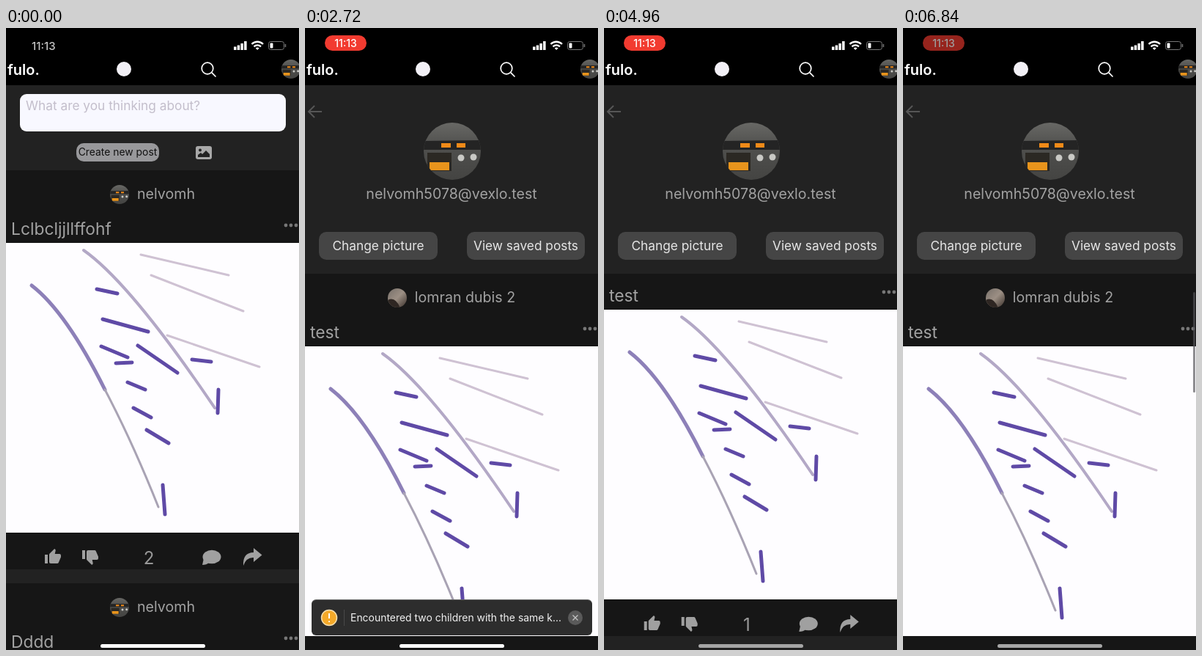
An HTML page that plays this animation: 400x848 px, repeating every 6880 ms.

```html
<!DOCTYPE html>
<html lang="en">
<head>
<meta charset="utf-8">
<title>Feed and profile</title>
<style>
@property --y { syntax: "<number>"; inherits: true; initial-value: 0; }

html, body { margin: 0; width: 100%; height: 100%; overflow: hidden; background: #222; }
body { font-family: Inter, Roboto, sans-serif; color: #a2a2a2; }
#stage { position: relative; width: 400px; height: 848px; overflow: hidden; background: #222; }
#stage * { box-sizing: border-box; }
.abs, .view, .t { position: absolute; }
.view { inset: 0; }
.t { line-height: 1; transform: translateY(-50%); white-space: pre; }
.mid { left: 0; width: 100%; text-align: center; }
svg { position: absolute; left: 0; top: 0; overflow: visible; }

/* Every timeline shares one loop */
.anim { animation: 6.88s linear infinite; }

/* Header */
.head { left: 0; top: 0; width: 400px; height: 78px; background: #000; overflow: hidden; }
.brand { left: 2px; top: 57px; font-size: 20px; font-weight: 600; color: #fff; }
.clock { left: 35px; top: 24px; font-size: 15px; font-weight: 500; color: #c4c4c4; animation-name: clock; }
.pill { left: 27px; top: 10px; width: 57px; height: 21px; border-radius: 11px; background: #d6382d; animation-name: pill; }
.pill .t { top: 10.5px; font-size: 14px; font-weight: 500; color: #fff; }
.rec { animation-name: early; }
.pilltime { animation-name: late; }
.face { left: 376px; top: 43px; width: 26px; height: 26px; animation-name: face; }
.rec, .pilltime, .home, .stale, .fresh { animation-timing-function: step-end; }

/* Home */
.home { animation-name: home; }
.field { left: 19px; top: 90px; width: 363px; height: 51px; border-radius: 9px; background: #f8f8ff; }
.field .t { left: 8px; top: 16px; font-size: 17.3px; color: #c3becb; }
.create { left: 96px; top: 157px; width: 113px; height: 25px; border-radius: 10px; background: #98989b; color: #111; }
.create .t { top: 12.5px; font-size: 13.9px; }

/* Posts */
.post { left: 0; width: 400px; height: 544px; background: #161616; }
.who { left: 0; top: 20px; width: 100%; height: 26px; display: flex; justify-content: center; align-items: center; gap: 11px; font-size: 19.6px; line-height: 1; }
.who svg { position: static; flex: none; }
.title { left: 7px; top: 79.7px; font-size: 22.8px; }
.pic { left: 0; top: 99px; width: 400px; height: 395px; overflow: hidden; background: #fefdff; }
.count { left: 0; width: 390px; top: 529px; text-align: center; font-size: 24px; color: #999; }
.bare .who svg, .bare .dots { visibility: hidden; }

/* Profile */
.profile { animation-name: profile; }
.email { top: 227px; font-size: 19.6px; }
.btn { top: 278px; width: 162px; height: 38px; border-radius: 10px; background: #454545; color: #e6e6e6; }
.btn .t { top: 19px; font-size: 17.3px; }
.list { left: 0; top: 335px; width: 400px; height: 513px; overflow: hidden; animation-name: scroll; }
.track { inset: 0; transform: translateY(calc(var(--y) * -1px)); }
.thumb { left: 396px; top: 25px; width: 3px; height: 137px; border-radius: 2px; background: rgba(84, 84, 88, .66); transform: translateY(calc(var(--y) * .265px)); }
.fade { inset: 0; animation-name: thumb; }
.stale { animation-name: stale; }
.fresh { animation-name: fresh; }

/* Toast */
.toast { left: 9px; top: 780px; width: 383px; height: 48px; border-radius: 6px; background: #2d2d2d; box-shadow: 0 -1px 0 #666; animation-name: toast; }
.toast .t { left: 53px; top: 24px; font-size: 13.95px; color: #f0f0f0; }
.bar { left: 129px; top: 840px; width: 143px; height: 5px; border-radius: 3px; animation-name: bar; }

@keyframes clock { 0%, 1% { opacity: 1 } 4%, 100% { opacity: 0 } }
@keyframes pill {
  0%, 1% { opacity: 0 }
  4%, 28% { opacity: 1; background: #d6382d }
  34%, 97.4% { opacity: 1; background: #f23b30 }
  99.4%, 100% { opacity: .62; background: #f23b30 }
}
@keyframes early { 0% { opacity: 1 } 29%, 100% { opacity: 0 } }
@keyframes late { 0% { opacity: 0 } 29%, 100% { opacity: 1 } }
@keyframes home { 0% { visibility: visible } 11.04%, 100% { visibility: hidden } }
@keyframes profile {
  0% { opacity: 0 }
  11.04% { opacity: 0; animation-timing-function: ease-in-out }
  19.8%, 100% { opacity: 1 }
}
@keyframes face {
  0%, 11.03% { opacity: 1 }
  11.04% { opacity: 0; animation-timing-function: ease-in-out }
  19.8%, 100% { opacity: 1 }
}
@keyframes stale { 0% { visibility: visible } 26.16%, 100% { visibility: hidden } }
@keyframes fresh { 0% { visibility: hidden } 26.16%, 100% { visibility: visible } }
@keyframes scroll {
  0% { --y: 0 }
  43.02% { --y: 0; animation-timing-function: cubic-bezier(.5, 0, .8, .5) }
  52.91% { --y: 161.5; animation-timing-function: cubic-bezier(.3, .25, .5, .9) }
  61.05% { --y: 1104.5; animation-timing-function: ease-out }
  63.4% { --y: 1176 }
  74.42% { --y: 1176; animation-timing-function: cubic-bezier(.4, 0, .75, .7) }
  80.81% { --y: 412; animation-timing-function: cubic-bezier(.2, .5, .4, 1) }
  93%, 100% { --y: 0 }
}
@keyframes thumb {
  0%, 43% { opacity: 0 }
  45%, 67% { opacity: 1 }
  71%, 74.4% { opacity: 0 }
  75.5%, 100% { opacity: 1 }
}
@keyframes toast {
  0%, 26.7% { opacity: 0 }
  28%, 68.6% { opacity: 1 }
  71%, 100% { opacity: 0 }
}
@keyframes bar { 0%, 46% { background: #fff } 50.5%, 100% { background: #a6a6a6 } }
</style>
</head>
<body>
<svg width="0" height="0" aria-hidden="true">
  <defs>
    <clipPath id="disc"><circle cx="39" cy="39" r="39"/></clipPath>
    <linearGradient id="panel" x2="0" y2="1">
      <stop offset="0" stop-color="#686865"/><stop offset=".4" stop-color="#50504e"/><stop offset="1" stop-color="#444442"/>
    </linearGradient>
    <linearGradient id="warm" x2="1" y2="1">
      <stop offset="0" stop-color="#77706a"/><stop offset=".5" stop-color="#9c8f84"/><stop offset="1" stop-color="#3a302a"/>
    </linearGradient>
    <symbol id="machine" viewBox="0 0 78 78">
      <g clip-path="url(#disc)">
        <path fill="url(#panel)" d="M0 0h78v78H0z"/>
        <path fill="#242424" d="M0 25l78-1v13H0z"/>
        <path fill="#2b2823" d="M5 41h33v25H5z"/>
        <path fill="#e8941c" d="M8 54h27v11H8z"/>
        <path fill="#f08a18" d="M24 28h13v6H24zM45 28h12v6H45z"/>
        <g fill="#c9c9c5"><circle cx="51" cy="48" r="4.5"/><circle cx="68" cy="47" r="4.5"/></g>
      </g>
    </symbol>
    <symbol id="person" viewBox="0 0 78 78">
      <g clip-path="url(#disc)">
        <path fill="url(#warm)" d="M0 0h78v78H0z"/>
        <path fill="#2e2622" d="M0 48q30-16 50 30H0z"/>
      </g>
    </symbol>
    <symbol id="thumb" viewBox="0 0 24 24">
      <path d="M1 21h4V9H1zM23 10a2 2 0 0 0-2-2h-6.3l1-4.6a1.5 1.5 0 0 0-.4-1.4L14.200 1 7.600 7.600A2 2 0 0 0 7 9v10a2 2 0 0 0 2 2h9a2 2 0 0 0 1.800-1.200l3-7a2 2 0 0 0 .2-.8z"/>
    </symbol>
    <symbol id="ink" viewBox="0 0 400 395">
      <g fill="none" stroke-linecap="round">
        <path stroke="#8d80b8" stroke-width="5" d="M35 58Q82 94 135 200"/>
        <path stroke="#a9a3b4" stroke-width="3" d="M135 200Q172 270 208 360"/>
        <path stroke="#b3a8c6" stroke-width="4" d="M106 10Q170 55 285 225"/>
        <path stroke="#cfc2d3" stroke-width="3" d="M198 44L324 93M220 126L346 169M184 16L304 44"/>
        <path stroke="#5f4aa6" stroke-width="5" d="M132 104L194 121M180 140L234 177M130 141L166 156M150 164L172 163M166 190L190 200M174 225L198 238M192 255L222 273M290 200L289 232M214 330L217 370M124 63L152 69M254 159L280 162"/>
      </g>
    </symbol>
  </defs>
</svg>

<div id="stage">
  <div class="view home anim" id="home">
    <div class="abs field"><div class="t">What are you thinking about?</div></div>
    <div class="abs create"><div class="t mid">Create new post</div></div>
    <svg width="400" height="200">
      <rect x="259" y="161" width="22" height="18" rx="3" fill="#a8a8a8"/>
      <circle cx="265" cy="166.500" r="2" fill="#222"/>
      <path d="M262 176v-3l4-3 2 2 5-5 5 5v4z" fill="#222"/>
    </svg>
  </div>

  <div class="view profile anim">
    <svg width="400" height="335">
      <path d="M23 114H5M13 106l-8 8 8 8" fill="none" stroke="#565656" stroke-width="2"/>
    </svg>
    <div class="abs fresh anim" style="left:162px;top:129px">
      <svg width="78" height="78"><use href="#machine"/></svg>
    </div>
    <div class="t mid email">nelvomh5078@vexlo.test</div>
    <div class="abs btn" style="left:19px"><div class="t mid">Change picture</div></div>
    <div class="abs btn" style="left:221px;width:161px"><div class="t mid">View saved posts</div></div>
    <div class="abs list anim">
      <div class="abs track">
        <div class="abs stale anim" id="stale"></div>
        <div class="abs fresh anim" id="fresh"></div>
      </div>
      <div class="abs fade anim"><div class="abs thumb"></div></div>
    </div>
  </div>

  <div class="abs toast anim">
    <svg width="383" height="48">
      <circle cx="24" cy="24" r="10.500" fill="#f4a929" stroke="#f7dfae" stroke-width="1.500"/>
      <path d="M24 18v7M24 28.500v1.500" stroke="#fff" stroke-width="2"/>
      <path d="M44.500 13v22" stroke="#484848"/>
      <circle cx="360" cy="24" r="10" fill="#5a5a5a"/>
      <path d="M356.500 20.500l7 7m0-7l-7 7" stroke="#c4c4c4" stroke-width="1.300"/>
    </svg>
    <div class="t">Encountered two children with the same k...</div>
  </div>

  <div class="abs head">
    <div class="t clock anim">11:13</div>
    <div class="abs pill anim">
      <svg class="rec anim" width="57" height="21">
        <circle cx="28.500" cy="10.500" r="6.300" fill="none" stroke="#fff" stroke-width="1.500"/>
        <circle cx="28.500" cy="10.500" r="3" fill="#fff"/>
      </svg>
      <div class="t mid pilltime anim">11:13</div>
    </div>
    <svg width="400" height="78">
      <path fill="#fff" d="M311 25.500h3.500V30H311zM315.700 23.500h3.500V30h-3.500zM320.400 21h3.500v9h-3.500zM325.100 18h3.500v12h-3.500z"/>
      <g fill="none" stroke="#fff" stroke-width="2.400">
        <path d="M335.500 22a11 11 0 0 1 15.500 0M338.500 25.300a6.800 6.800 0 0 1 9.500 0"/>
      </g>
      <path fill="#fff" d="M340.700 27.500a4 4 0 0 1 5 0L343.200 30z"/>
      <rect x="358.500" y="18.500" width="21" height="11" rx="3" fill="none" stroke="#777"/>
      <path d="M381.500 22v4" stroke="#777" stroke-width="1.500"/>
      <rect x="360.500" y="20.500" width="4" height="7" rx="1" fill="#fff"/>
      <circle cx="161" cy="56" r="10" fill="#f2f0f6"/>
      <g fill="none" stroke="#fff" stroke-width="1.700" stroke-linecap="round">
        <circle cx="275" cy="55" r="7.800"/><path d="M280.700 60.700l5.300 5.300"/>
      </g>
    </svg>
    <div class="t brand">fulo.</div>
    <div class="abs face anim"><svg width="26" height="26"><use href="#machine"/></svg></div>
  </div>
  <div class="abs bar anim"></div>
</div>

<script>
const STRIDE = 563;
const owner = { name: "nelvomh", art: "machine" };
const guest = { name: "lomran dubis 2", art: "person" };

function post(top, who, title, count, bare = false) {
  const shift = count === 1 ? 1.7 : 0;
  return `<div class="abs post${bare ? " bare" : ""}" style="top:${top}px">
    <div class="abs who"><svg width="26" height="26"><use href="#${who.art}"/></svg>${who.name}</div>
    <div class="t title">${title}</div>
    <div class="abs pic"><svg width="400" height="395"><use href="#ink"/></svg></div>
    <svg width="400" height="544" fill="#a0a0a0">
      <g class="dots" fill="#777">${[382, 389, 396].map(x => `<circle cx="${x}" cy="75" r="2.4"/>`).join("")}</g>
      <g transform="translate(${shift})">
        <use href="#thumb" x="52" y="515" width="24" height="24"/>
        <use href="#thumb" width="24" height="24" transform="matrix(1 0 0 -1 103 539)"/>
      </g>
      <g transform="translate(${-shift})">
        <ellipse cx="281" cy="527" rx="12.500" ry="9.300"/>
        <path d="M270 529l-2 9q6 0 9-3z"/>
        <path d="M324 539q-1-18 14-18v-6l11.500 9.500-11.500 9.500v-6q-10-.5-14 11z"/>
      </g>
    </svg>
    <div class="t count">${count}</div>
  </div>`;
}

function fill(id, html) {
  document.getElementById(id).insertAdjacentHTML("beforeend", html);
}

const gibberish = "Lclbcljjllffohf";
fill("home", post(194, owner, gibberish, 2) + post(194 + STRIDE, owner, "Dddd", 1));
fill("stale", post(0, owner, gibberish, 2, true));
fill("fresh", post(0, guest, "test", 1) + post(STRIDE, owner, gibberish, 2) + post(2 * STRIDE, guest, "test", 1));
</script>
</body>
</html>
```
